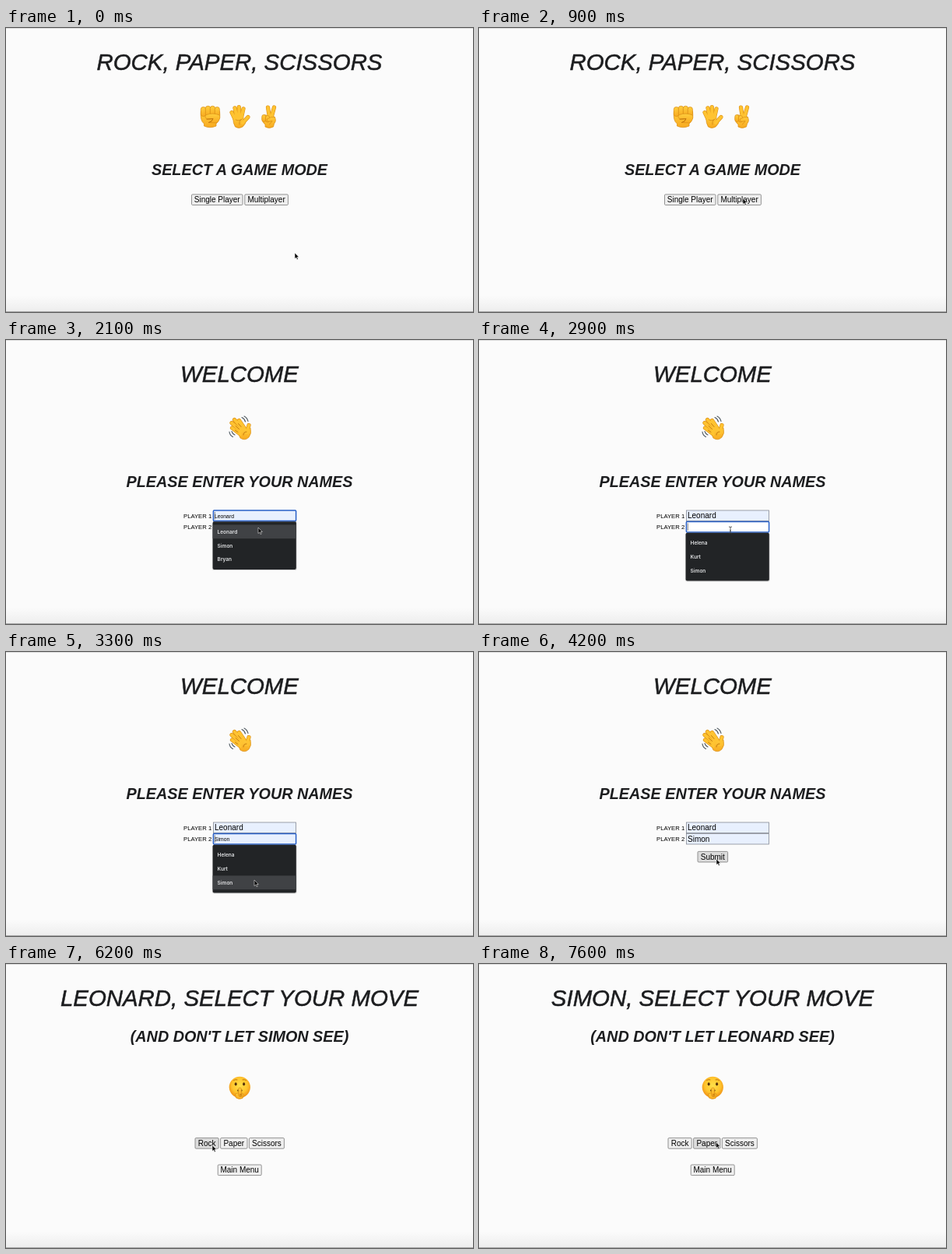
An HTML page that plays this animation: 600x365 px, repeating every 8000 ms.

```html
<!DOCTYPE html>
<html lang="en">
<head>
<meta charset="utf-8">
<title>Rock, Paper, Scissors</title>
<style>
  html, body { margin: 0; width: 100%; height: 100%; overflow: hidden; background: #fbfbfb; }
  svg { display: block; width: 100%; height: 100%; }
  text { font-family: "Liberation Sans", Arial, sans-serif; fill: #1c1d1f; }
  .title, .heading { font-style: italic; text-anchor: middle; }
  .title { font-size: 29.4px; stroke: #1c1d1f; stroke-width: .5px; }
  .heading { font-size: 19.8px; font-weight: bold; }
  .label { font-size: 7.7px; fill: #000; }
  .button text { font-size: 10px; text-anchor: middle; fill: #000; }
  .button rect { fill: #efefef; stroke: #7a7a7a; stroke-width: .8; }
  .button.hover rect { fill: #dcdcdc; }
  .option { font: 600 6.5px Inter, sans-serif; fill: #e3e4e6; }
  .field text { fill: #000; }
  .hand { fill: url(#skin); stroke: #d98c14; stroke-width: .7; stroke-linejoin: round; }
  .limbs { fill: none; stroke-linecap: round; }
  .edge { stroke: #dc9016; stroke-width: 5.2; }
  .flesh { stroke: #ffc331; stroke-width: 4; }
  .crease { fill: none; stroke: #bd700c; stroke-width: .9; stroke-linecap: round; }
</style>
</head>
<body>
<svg viewBox="0 0 600 365" preserveAspectRatio="none">
  <defs>
    <linearGradient id="skin" x2="0" y2="1">
      <stop stop-color="#ffce3d"/><stop offset="1" stop-color="#f8aa20"/>
    </linearGradient>
    <radialGradient id="face" cy=".42" r=".6">
      <stop stop-color="#ffe04a"/><stop offset=".6" stop-color="#ffc52d"/><stop offset="1" stop-color="#ee8b13"/>
    </radialGradient>
    <linearGradient id="shade" x2="0" y2="1">
      <stop stop-color="#fbfbfb"/><stop offset="1" stop-color="#ededed"/>
    </linearGradient>
    <path id="openFingers" d="M294 117L290 108.500M296.500 115L294 102.800M299.500 114L299.300 101.500M302.500 115L305 103.800M304 122L311 114.500"/>
    <path id="twoFingers" d="M338.500 115L336.500 102M341 115L344.500 102"/>
    <path id="waveFingers" d="M301 121L290.500 113M302 117L290 106.500M304 114L293.500 102.500M306 113L299.500 103.500M309.500 119L312 109.500"/>
  </defs>

  <rect width="600" height="365" fill="#fbfbfb"/>
  <rect y="344" width="600" height="21" fill="url(#shade)"/>
  <rect width="600" height="1" fill="#dcdcdc"/>
  <rect y="364" width="600" height="1" fill="#a8a8a8"/>

  <g class="scene">
    <text class="title" x="300" y="54">ROCK, PAPER, SCISSORS</text>
    <g class="hand">
      <path d="M250.500 107Q249 119 254.500 123V126Q262 129.500 270 126V123Q276 117 274.500 107Z"/>
      <rect x="250.300" y="101.500" width="6.500" height="12" rx="3"/>
      <rect x="256.300" y="100.300" width="6.500" height="13" rx="3"/>
      <rect x="262.300" y="100.300" width="6.300" height="13" rx="3"/>
      <rect x="268.200" y="101.500" width="6.200" height="12" rx="3"/>
      <path d="M274.500 112Q266 108.500 257.500 111.500Q254 114.500 258.500 117L266 116.500Q265 120 260.500 121.500L271 122Q276 117 274.500 112Z"/>
    </g>
    <path class="crease" d="M258 117.200L266 116.700Q265 120.500 260.500 121.500"/>
    <use href="#openFingers" class="limbs edge"/>
    <path class="hand" d="M291.800 115Q299 110 304.800 114L305 119L309 117Q308 124 304 127Q299 130 294.500 127Q291.500 122 291.800 115Z"/>
    <use href="#openFingers" class="limbs flesh"/>
    <path class="crease" d="M303 117Q299 119 300 124M295 118Q298 120 302 118" opacity=".6"/>
    <use href="#twoFingers" class="limbs edge"/>
    <path class="hand" d="M329.500 114Q332 110 336 113L345 114Q348 119 344.500 123L343.500 127Q338 130 333 127V124Q328 120 329.500 114Z"/>
    <use href="#twoFingers" class="limbs flesh"/>
    <g class="hand">
      <rect x="328.800" y="111.500" width="5" height="9" rx="2.400"/>
      <rect x="333.500" y="112.500" width="5" height="8.500" rx="2.400"/>
      <path d="M346 115Q341 113 335.500 117Q334.500 120 338 120.300L342 119.500Q340 123 338 124"/>
    </g>
    <text class="heading" x="300" y="188.500">SELECT A GAME MODE</text>
  </g>

  <g class="scene">
    <text class="title" x="300" y="54">WELCOME</text>
    <use href="#waveFingers" class="limbs edge"/>
    <path class="hand" d="M298 119Q300 111 308 112L310 116L314 113Q316 120 312 125Q307 130 301 126Z"/>
    <use href="#waveFingers" class="limbs flesh"/>
    <path class="crease" d="M298 118.500L294.500 116M299.500 114.500L295 110.500M302 111.500L298.500 107.500M309 118Q305 118 305 122"/>
    <path d="M303 99.500Q306.500 101 307.500 105M306 98Q310 100 311 104.500M287 118Q287.500 122.500 291.500 124.500M290 117.500Q291 120.500 294 122" fill="none" stroke="#4c565e" stroke-width="1.100" stroke-linecap="round"/>
    <text class="heading" x="300" y="188.500">PLEASE ENTER YOUR NAMES</text>
    <text class="label" x="228" y="228.800">PLAYER 1</text>
    <text class="label" x="228" y="243.200">PLAYER 2</text>
    <g id="fields"></g>
  </g>

  <g class="scene">
    <text class="title" id="moveTitle" x="300" y="54"></text>
    <text class="heading" id="moveHint" x="300" y="100"></text>
    <circle cx="300.300" cy="158.300" r="13.600" fill="url(#face)"/>
    <g fill="#54300a">
      <ellipse cx="295.200" cy="154.300" rx="1.500" ry="2.100"/>
      <ellipse cx="305.600" cy="154.300" rx="1.500" ry="2.100"/>
      <ellipse cx="300.400" cy="162.500" rx="3.200" ry="1.500"/>
    </g>
    <path class="crease" d="M292.500 149.500Q294.500 148 297 148.800M304 148.800Q306.500 148 308.500 149.500"/>
    <g class="hand">
      <path d="M294.500 167Q298 164.500 304 166Q306.500 169 304 172.500Q299 174.500 295.500 172Z"/>
      <rect x="298.600" y="159" width="3.800" height="11" rx="1.900"/>
    </g>
    <path class="crease" d="M303 167.500H300.500M303.500 169.700H300.500"/>
  </g>

  <g id="buttons"></g>
  <g id="menu"></g>
  <g id="cursor">
    <path id="arrow" d="M0 0V7.600L1.800 6L3 8.700L4.300 8.100L3.100 5.500H5.400Z" fill="#080808" stroke="#fff" stroke-width=".5"/>
    <path id="beam" d="M-2-4Q0-4 0-3Q0-4 2-4M0-3V4M-2 5Q0 5 0 4Q0 5 2 5M-1 1H1" fill="none" stroke="#333" stroke-width=".8"/>
  </g>
</svg>

<script>
const LOOP = 8000, STEP = 100;
const FORM = 1, MOVE = 2;
const players = ["Leonard", "Simon"];
const turns = [
  { start: 0, scene: 0, hoverFrom: 1100 },
  { start: 1200, scene: FORM, hoverFrom: 1500 },
  { start: 4400, scene: MOVE, hoverFrom: 5100, player: 0 },
  { start: 6300, scene: MOVE, hoverFrom: 6600, player: 1 },
];
const fields = [
  { y: 219, focus: 1600, open: 1800, filled: 2400, blur: 2600, names: ["Leonard", "Simon", "Bryan"] },
  { y: 233.4, focus: 2600, open: 2700, filled: 3500, blur: 4200, names: ["Helena", "Kurt", "Simon"] },
];
// Pointer stops: time, x, y
const path = [
  [0, 371, 289], [300, 348, 240], [500, 339, 219], [1400, 339, 219], [1700, 327, 221],
  [1900, 325, 228], [2100, 324, 241], [2300, 324, 243], [2900, 323, 244], [3300, 319, 293],
  [3700, 319, 293], [4200, 305, 266], [5000, 305, 266], [5600, 265, 233], [6500, 265, 233],
  [6700, 270, 252], [6800, 278, 277], [6900, 287, 275], [7000, 296, 253], [7200, 304.5, 229],
];
const buttons = [
  [0, "Single Player", 238.5, 213.9, 65.5], [0, "Multiplayer", 306.8, 213.9, 55.6],
  [FORM, "Submit", 281, 256.4, 38.6],
  [MOVE, "Rock", 243, 223.6, 30.2], [MOVE, "Paper", 275.6, 223.6, 34.4],
  [MOVE, "Scissors", 312.4, 223.6, 45], [MOVE, "Main Menu", 272.2, 258, 56],
].map(([scene, label, x, y, w]) => ({ scene, label, x, y, w, h: 13.6 }));

const $ = id => document.getElementById(id);
const scenes = document.querySelectorAll(".scene");
const show = (node, on) => node.setAttribute("display", on ? "inline" : "none");

$("buttons").innerHTML = buttons.map(({ label, x, y, w, h }) =>
  `<g class="button"><rect x="${x}" y="${y}" width="${w}" height="${h}" rx="1.2"/>
   <text x="${x + w / 2}" y="${y + 10.2}">${label}</text></g>`).join("");
const buttonNodes = [...$("buttons").children];

function pointerAt(t) {
  const next = path.findIndex(stop => stop[0] > t);
  if (next < 0) return path.at(-1).slice(1);
  const [a, b] = [path[next - 1], path[next]];
  const k = (t - a[0]) / (b[0] - a[0]);
  return [a[1] + (b[1] - a[1]) * k, a[2] + (b[2] - a[2]) * k];
}

function fieldMarkup(field, t, hovered) {
  const { y, names } = field;
  const focused = t >= field.focus && t < field.blur;
  const filled = t >= field.filled;
  const value = filled ? players[fields.indexOf(field)] : hovered || "";
  const caretX = filled ? 268 + value.length * 5.1 : 268.3;
  return `<g class="field">
    <rect x="266.4" y="${y}" width="106.2" height="13.6" rx="${focused ? 1 : 0}"
      fill="${value ? "#e8f0fe" : "#fff"}" stroke="${focused ? "#2860c8" : "#858a94"}"
      stroke-width="${focused ? 1.5 : .8}"/>
    <text x="268" y="${y + (filled ? 10.2 : 9.6)}" font-size="${filled ? 10 : 6.8}">${value}</text>
    ${focused ? `<path d="M${caretX} ${y + 2}v9.600" stroke="#333" stroke-width=".6"/>` : ""}</g>`;
}

function menuMarkup({ names }, top, row) {
  const rowHeight = 17.8;
  return `<rect x="265" y="${top}" width="108.6" height="62.6" rx="2.5" fill="#000" opacity=".18"/>
    <rect x="265.6" y="${top}" width="107.2" height="61.6" rx="2" fill="#222426"/>` +
    names.map((name, i) => {
      const y = top + 4 + i * rowHeight;
      return (i === row ? `<rect x="265.6" y="${y}" width="107.2" height="${rowHeight}" fill="#404245"/>` : "") +
        `<text class="option" x="271.6" y="${y + 11.4}">${name}</text>`;
    }).join("");
}

function render(t) {
  const turn = turns.findLast(item => item.start <= t);
  const [x, y] = pointerAt(t);
  scenes.forEach((node, i) => show(node, i === turn.scene));

  buttons.forEach((b, i) => {
    const inside = x >= b.x && x <= b.x + b.w && y >= b.y && y <= b.y + b.h;
    show(buttonNodes[i], b.scene === turn.scene);
    buttonNodes[i].classList.toggle("hover", inside && t >= turn.hoverFrom);
  });

  if (turn.scene === MOVE) {
    const name = players[turn.player].toUpperCase();
    const rival = players[1 - turn.player].toUpperCase();
    $("moveTitle").textContent = `${name}, SELECT YOUR MOVE`;
    $("moveHint").textContent = `(AND DON'T LET ${rival} SEE)`;
  }

  const open = fields.find(f => t >= f.open && t < f.filled);
  const top = open ? open.y + 14.4 : Infinity;
  const row = Math.floor((y - top - 4) / 17.8);
  $("menu").innerHTML = open ? menuMarkup(open, top, row) : "";
  // The focused field goes last so its ring stays on top.
  if (turn.scene === FORM) {
    $("fields").innerHTML = [...fields]
      .sort((a, b) => (t >= a.focus && t < a.blur) - (t >= b.focus && t < b.blur))
      .map(f => fieldMarkup(f, t, f === open && f.names[row])).join("");
  }

  const beam = turn.scene === FORM && y > 219.5 && y < 247 && y < top;
  show($("beam"), beam);
  show($("arrow"), !beam);
  $("cursor").setAttribute("transform", `translate(${x} ${y})`);
}

const startTime = performance.now();
function frame() {
  const t = (performance.now() - startTime) % LOOP;
  render(Math.floor(t / STEP) * STEP);
  requestAnimationFrame(frame);
}
frame();
</script>
</body>
</html>
```
